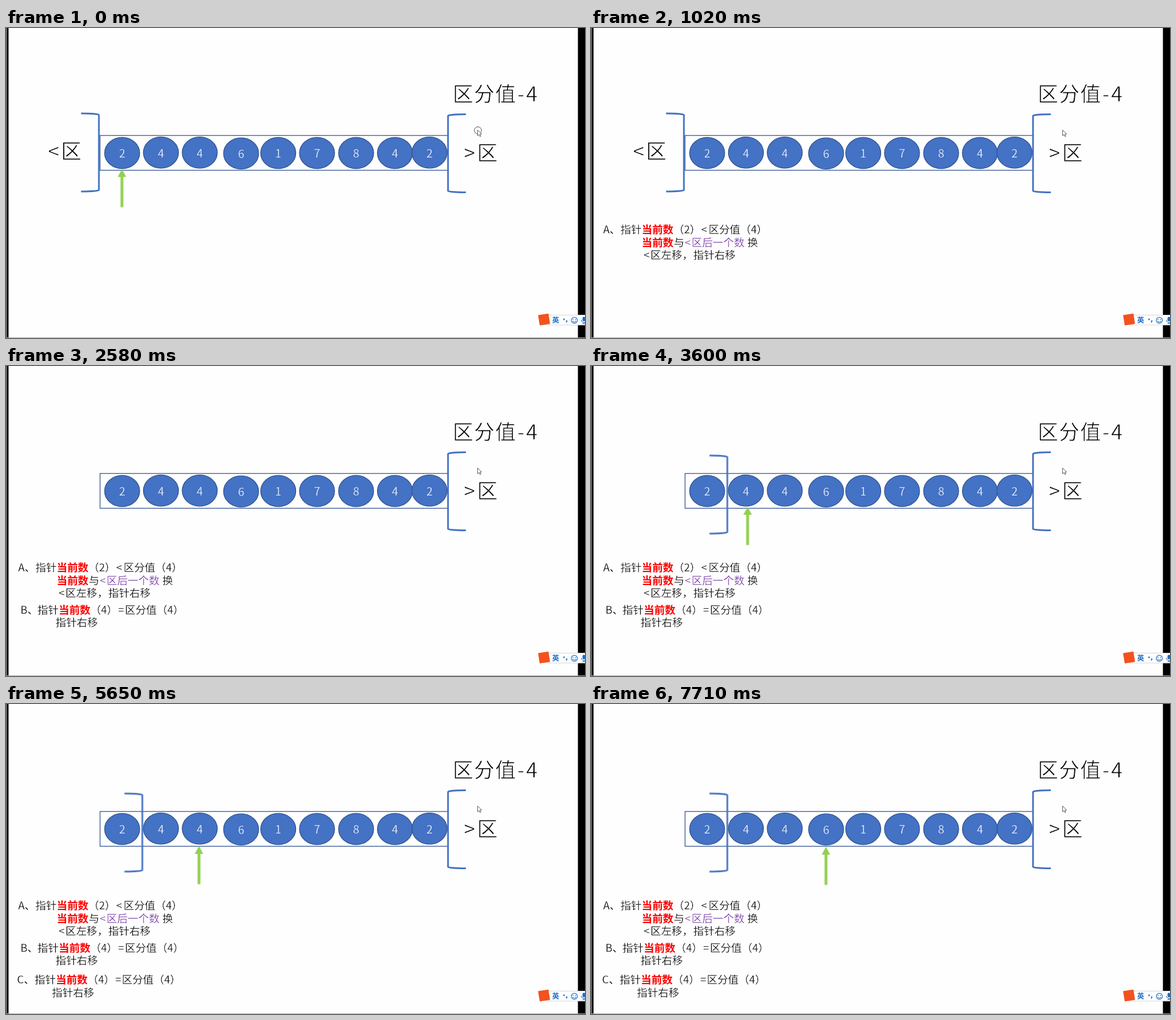
Recreate the animation shown at these times as an HTML page. Size 1022 by 548 pixels, loop 8 s.

```html
<!DOCTYPE html>
<html lang="zh-CN">
<head>
<meta charset="utf-8">
<title>区分值</title>
<style>
html, body { margin: 0; width: 100%; height: 100%; overflow: hidden; background: #fefefe; }
svg { display: block; width: 1022px; height: 548px; }
text {
  font-family: "Noto Sans CJK SC", "Noto Sans CJK", sans-serif;
  font-weight: 350;
  white-space: pre;
}
/* An outline in the background colour gives the text a lighter weight. */
.big { font-size: 36.3px; letter-spacing: 1.2px; stroke: #fefefe; stroke-width: .9; }
.note { font-size: 18.7px; stroke: #fefefe; stroke-width: .3; }
.key { fill: #f00; font-weight: 700; stroke: none; }
.zone { fill: #7030a0; }
.balls text { font-size: 20px; fill: #fff; stroke: #4472c4; stroke-width: .4; text-anchor: middle; }
.bracket { fill: none; stroke: #4472c4; stroke-width: 3; }
.arrow { fill: #92d050; }

/* Every part switches on and off abruptly within one 8 s loop. */
.step { animation: 8s step-end infinite; }
.ring { animation-name: ring; }
.noteA { animation-name: noteA; }
.noteB { animation-name: noteB; }
.noteC { animation-name: noteC; }
.left1 { animation-name: left1; }
.left2 { animation-name: left2; }
.arrow1 { animation-name: arrow1; }
.arrow2 { animation-name: arrow2; }
.arrow3 { animation-name: arrow3; }
.arrow4 { animation-name: arrow4; }
@keyframes ring {
  0%, 26%, 57.75% { opacity: 1; }
  6.5%, 32.25%, 64.375%, 100% { opacity: 0; }
}
@keyframes noteA { 0% { opacity: 0; } 6.5%, 100% { opacity: 1; } }
@keyframes noteB { 0% { opacity: 0; } 32.25%, 100% { opacity: 1; } }
@keyframes noteC { 0% { opacity: 0; } 70.625%, 100% { opacity: 1; } }
@keyframes left1 { 0% { opacity: 1; } 19.375%, 100% { opacity: 0; } }
@keyframes left2 { 0% { opacity: 0; } 45%, 100% { opacity: 1; } }
@keyframes arrow1 { 0% { opacity: 1; } 12.75%, 100% { opacity: 0; } }
@keyframes arrow2 { 0%, 51.5%, 100% { opacity: 0; } 38.75% { opacity: 1; } }
@keyframes arrow3 { 0%, 83.5%, 100% { opacity: 0; } 64.375% { opacity: 1; } }
@keyframes arrow4 { 0% { opacity: 0; } 96.375%, 100% { opacity: 1; } }
</style>
</head>
<body>
<svg viewBox="0 0 1022 548">
  <defs>
    <ellipse id="ball" rx="31" ry="27.6" fill="#4472c4" stroke="#2f528f" stroke-width="1.3"/>
    <path id="pointer" d="M0 0 L7.5 14 H2.5 V67.5 H-2.5 V14 H-7.5 Z"/>
    <path id="close" d="M-31.5 0 A31.5 2.6 0 0 1 0 2.6 V135.4 A31.5 2.6 0 0 1 -31.5 138"/>
  </defs>

  <rect width="1022" height="548" fill="#fefefe"/>
  <rect width="1" height="548" fill="#b5b5b5"/>
  <rect x="1" width="3.5" height="547" fill="#000"/>
  <rect x="1009.5" width="12.5" height="547" fill="#000"/>
  <rect y="547" width="1022" height="1" fill="#a6a6a6"/>

  <rect x="166" y="190" width="614" height="61.5" fill="#fff" stroke="#2f528f" stroke-width="1.3"/>
  <g class="balls">
    <g transform="translate(205 221)"><use href="#ball"/><text y="8.4">2</text></g>
    <g transform="translate(273.5 220.2)"><use href="#ball"/><text y="8.4">4</text></g>
    <g transform="translate(342 220.2)"><use href="#ball"/><text y="8.4">4</text></g>
    <g transform="translate(415 221.8)"><use href="#ball"/><text y="8.4">6</text></g>
    <g transform="translate(480.5 221)"><use href="#ball"/><text y="8.4">1</text></g>
    <g transform="translate(549 221)"><use href="#ball"/><text y="8.4">7</text></g>
    <g transform="translate(618 221)"><use href="#ball"/><text y="8.4">8</text></g>
    <g transform="translate(686.5 221)"><use href="#ball"/><text y="8.4">4</text></g>
    <g transform="translate(747.5 220.2)"><use href="#ball"/><text y="8.4">2</text></g>
  </g>

  <text class="big" y="129.5"><tspan x="788.5">区分值</tspan><tspan x="902.5">-</tspan><tspan x="918">4</tspan></text>
  <text class="big" y="234"><tspan x="808">&gt;</tspan><tspan x="831.5">区</tspan></text>
  <use href="#close" class="bracket" transform="translate(780.2 152.6) scale(-1 1)"/>

  <g class="step left1">
    <text class="big" y="230.5"><tspan x="74">&lt;</tspan><tspan x="97">区</tspan></text>
    <use href="#close" class="bracket" x="164" y="151"/>
  </g>
  <use href="#close" class="bracket step left2" x="240.6" y="158.2"/>

  <g class="arrow">
    <use href="#pointer" class="step arrow1" x="204.6" y="249.3"/>
    <use href="#pointer" class="step arrow2" x="276.4" y="249"/>
    <use href="#pointer" class="step arrow3" x="340.6" y="251"/>
    <use href="#pointer" class="step arrow4" x="414.7" y="252.3"/>
  </g>

  <g class="note step noteA">
    <text y="363"><tspan x="21.5">A、</tspan><tspan x="52">指针</tspan><tspan x="89.5" class="key">当前数</tspan><tspan x="145.5">（2）</tspan><tspan x="194.5">&lt;</tspan><tspan x="207.5">区分值（4）</tspan></text>
    <text y="386"><tspan x="89.5" class="key">当前数</tspan><tspan x="146">与</tspan><tspan class="zone"><tspan x="165.5">&lt;</tspan><tspan x="177.5">区后一个数</tspan></tspan><tspan x="276">换</tspan></text>
    <text y="408"><tspan x="93">&lt;</tspan><tspan x="105">区左移，</tspan><tspan x="180.5">指针右移</tspan></text>
  </g>
  <g class="note step noteB">
    <text y="437.5"><tspan x="25.5">B、</tspan><tspan x="55.5">指针</tspan><tspan x="93" class="key">当前数</tspan><tspan x="149">（4）</tspan><tspan x="198">=</tspan><tspan x="210">区分值（4）</tspan></text>
    <text x="87.5" y="460">指针右移</text>
  </g>
  <g class="note step noteC">
    <text y="494"><tspan x="19.5">C、</tspan><tspan x="50.5">指针</tspan><tspan x="88" class="key">当前数</tspan><tspan x="144">（4）</tspan><tspan x="193">=</tspan><tspan x="204.5">区分值（4）</tspan></text>
    <text x="81" y="516.5">指针右移</text>
  </g>

  <circle class="step ring" cx="833" cy="181" r="6.3" fill="none" stroke="#45454d"/>
  <path d="M832.5 180.3 V190.4 L834.9 188.4 L836.6 191.9 L838.2 191.1 L836.6 187.8 L839.5 187.4 Z" fill="#fff" stroke="#45455a" stroke-width=".9"/>

  <!-- input method bar -->
  <rect x="950" y="507.5" width="80" height="17.5" fill="#fff" stroke="#d6d6d6"/>
  <rect x="940.5" y="506" width="18.5" height="18.5" fill="#f4511e" transform="rotate(-9 949.7 515.2)"/>
  <text x="964" y="521.3" font-size="12.3" fill="#1b6fc9" style="font-weight:700">英</text>
  <g fill="#1b6fc9">
    <circle cx="985" cy="515" r="1.4"/>
    <path d="M988.5 517 h2.4 v1.6 l-1.5 2.6 h-1 l.6 -2.2 h-.5 z"/>
    <circle cx="1001" cy="515.4" r=".9"/>
    <circle cx="1005.4" cy="515.4" r=".9"/>
    <rect x="1017.6" y="510.5" width="5" height="8" rx="2.5"/>
  </g>
  <g fill="none" stroke="#1b6fc9" stroke-width="1.2">
    <circle cx="1003.2" cy="516.8" r="5.4"/>
    <path d="M1000.2 518 a3.1 2.7 0 0 0 6 0"/>
    <path d="M1015.6 516 a4.5 4.5 0 0 0 9 0 M1020 520.5 v2 M1017.5 522.5 h5"/>
  </g>
</svg>
</body>
</html>
```
